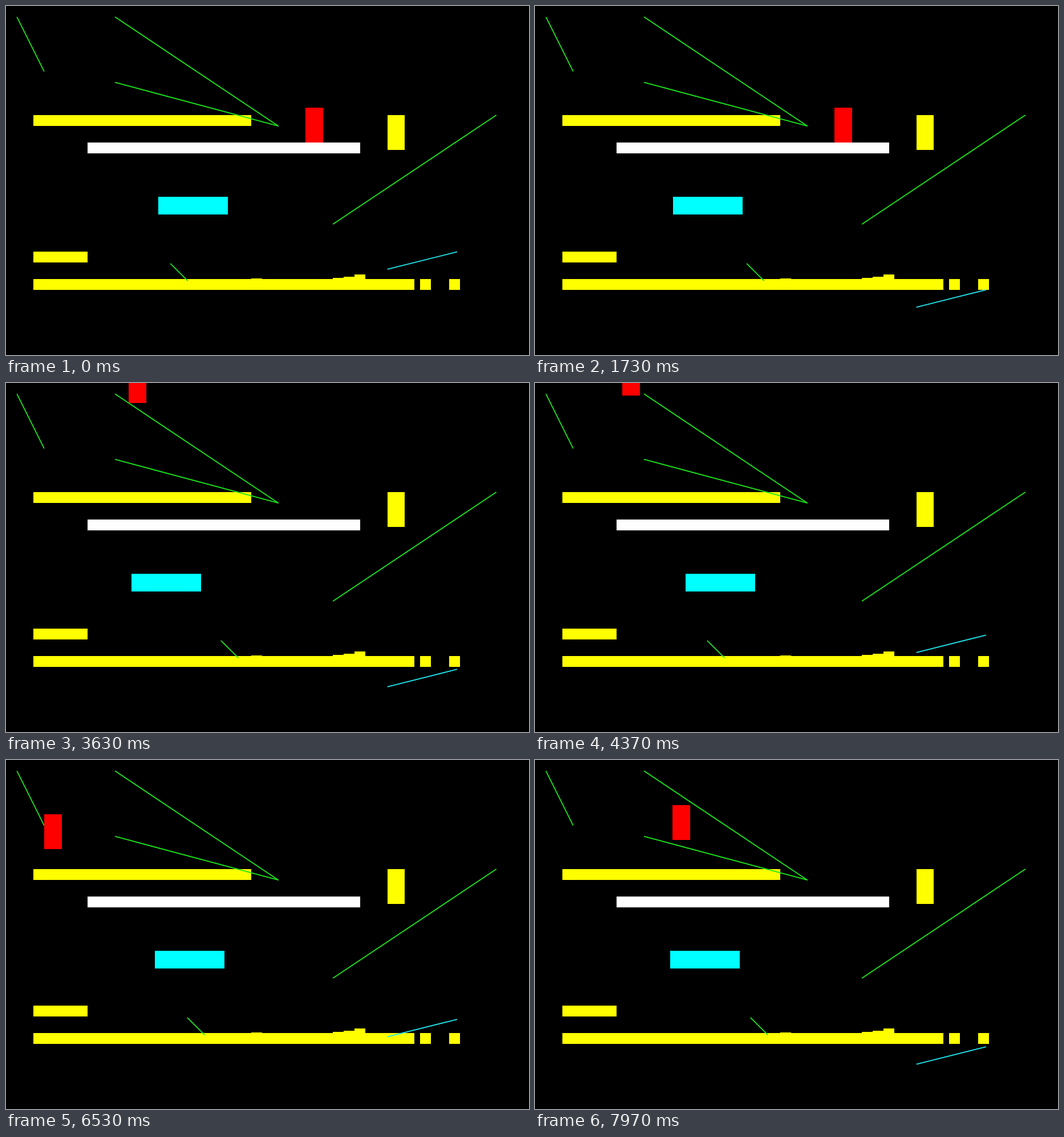
These frames come from a looping animation (917x611 px, 8000 ms). An HTML page:

```html
<!DOCTYPE html>
<html lang="en">
<head>
<meta charset="utf-8">
<title>Platformer</title>
<style>
  html, body { margin: 0; width: 100%; height: 100%; overflow: hidden; background: #000; }
  svg { display: block; width: 917px; height: 611px; }
  rect { shape-rendering: crispEdges; }
</style>
</head>
<body>
<svg id="stage" viewBox="0 0 917 611"></svg>
<script>
const LOOP = 8000;
const SCALE = 917 / 960;
const GRAVITY = 900;
const JUMP = 389;
const stage = document.getElementById('stage');

function add(tag, attrs) {
  const el = document.createElementNS('http://www.w3.org/2000/svg', tag);
  set(el, attrs);
  stage.append(el);
  return el;
}

function set(el, attrs) {
  for (const key in attrs) el.setAttribute(key, attrs[key]);
}

// World units in, whole screen pixels out.
const px = v => Math.round(v * SCALE);

function box(x, y, w, h, fill) {
  return add('rect', {
    x: px(x), y: px(y), width: px(x + w) - px(x), height: px(y + h) - px(y), fill
  });
}

function place(el, x, y) {
  set(el, { x: px(x), y: px(y) });
}

function line(x1, y1, x2, y2, stroke = '#1ce61c') {
  const el = add('line', { stroke, 'stroke-width': 1.8 });
  moveLine(el, x1, y1, x2, y2);
  return el;
}

function moveLine(el, x1, y1, x2, y2) {
  set(el, { x1: x1 * SCALE, y1: y1 * SCALE, x2: x2 * SCALE, y2: y2 * SCALE });
}

const YELLOW = '#ff0';
box(50, 500, 700, 20, YELLOW);
box(760, 500, 20, 20, YELLOW);
box(813, 500, 20, 20, YELLOW);
box(450, 499, 20, 20, YELLOW);
box(600, 498, 20, 20, YELLOW);
box(620, 496, 20, 20, YELLOW);
box(640, 492, 20, 20, YELLOW);
box(50, 450, 100, 20, YELLOW);
box(50, 200, 400, 20, YELLOW);
box(700, 200, 32, 64, YELLOW);
box(150, 250, 500, 20, '#fff');
const lift = box(200, 350, 128, 32, '#0ff');
const player = box(550, 186, 32, 64, '#f00');
line(20, 20, 70, 120);
line(200, 20, 500, 220);
line(200, 140, 500, 220);
line(600, 400, 900, 200);
const slider = line(300, 472, 332, 504);
const ramp = line(700, 480, 828, 448, '#22e6ee');

// Horizontal path of the player: [seconds, x]
const walk = [
  [0, 550], [2.007, 550], [3.912, 169], [4.275, 169], [4.32, 160],
  [5.223, 160], [5.563, 70], [7.062, 70], [8, 257.6]
];

function playerX(t) {
  let i = 1;
  while (i < walk.length - 1 && t > walk[i][0]) i++;
  const [t0, x0] = walk[i - 1], [t1, x1] = walk[i];
  return x0 + (x1 - x0) * (t - t0) / (t1 - t0);
}

const drop = dt => GRAVITY / 2 * dt * dt;
const jump = dt => drop(dt) - JUMP * dt;

function playerY(t, x) {
  if (t < 2.22) return 186;
  if (t < 4.285) {
    const slope = x > 500 ? 186 : 20 + Math.max(0, x - 200) * 2 / 3 - 64;
    return t < 2.8 ? Math.min(186 + jump(t - 2.22), slope) : slope;
  }
  if (t < 5.53) return Math.min(136, -44 + drop(t - 4.285));
  if (t < 6.22) return Math.max(56, 136 + jump(Math.min(t - 5.53, 0.4)));
  if (t < 7.277) return Math.min(136, 56 + drop(t - 6.22));
  return 136 + jump(t - 7.277);
}

function draw(t) {
  const clock = t + 1.002;
  place(lift, 240 - 40 * Math.cos(3 * clock), 350);

  const swing = (1 - Math.cos(6 * clock)) / 2;
  const sx = 300 + 100 * swing;
  const ry = 481.2 + 80 * swing;
  moveLine(slider, sx, 472, sx + 32, 504);
  moveLine(ramp, 700, ry, 828, ry - 32);

  const x = playerX(t);
  place(player, x, playerY(t, x));
}

const start = performance.now();
function tick() {
  draw((performance.now() - start) % LOOP / 1000);
  requestAnimationFrame(tick);
}
tick();
</script>
</body>
</html>
```
